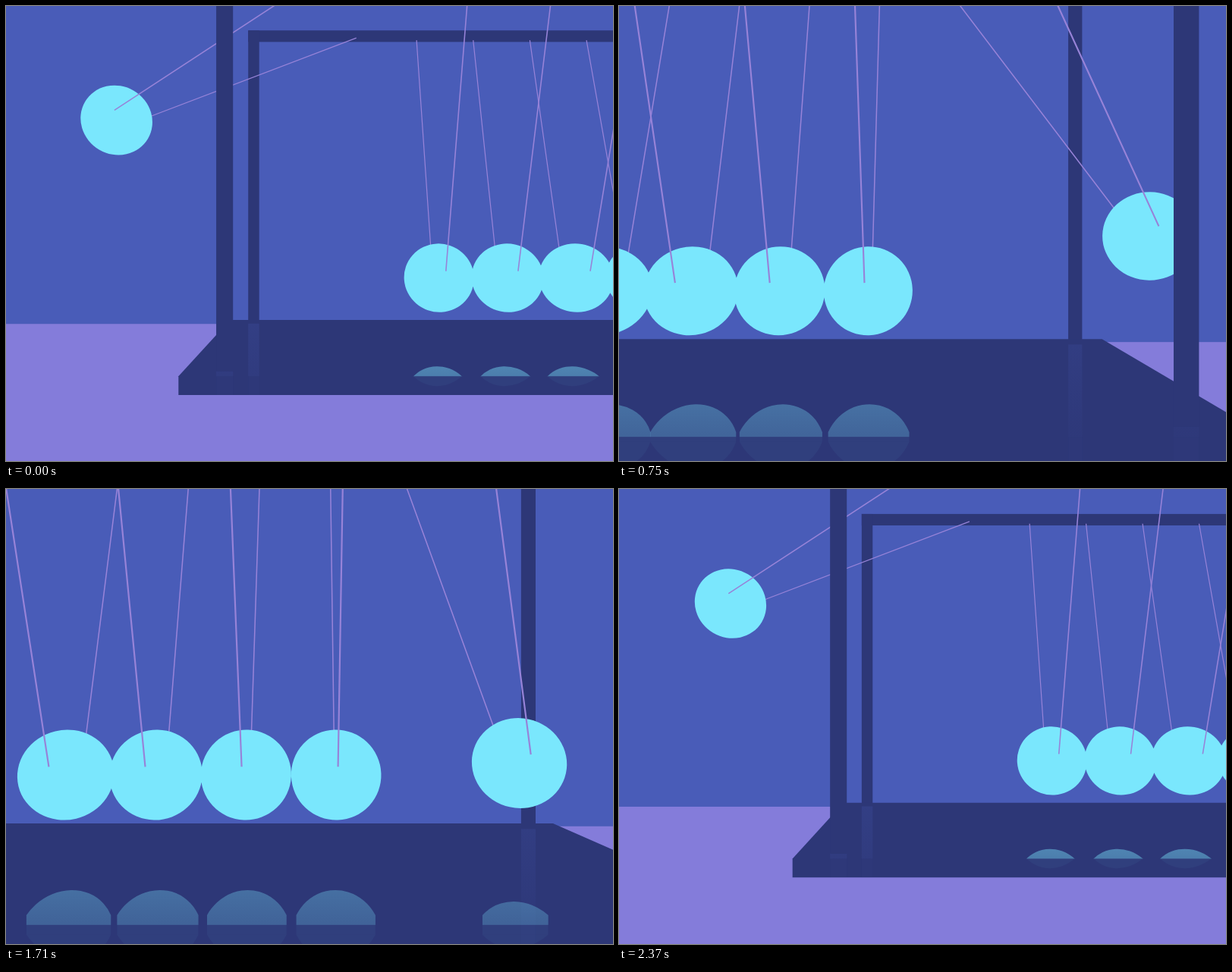
Recreate the animation shown at these times as an HTML page with a canvas. Size 800 by 600 pixels, loop 2400 ms.

```html
<!DOCTYPE html>
<html lang="en">
<head>
<meta charset="utf-8">
<title>Pendulum balls</title>
<style>
html, body { margin: 0; width: 100%; height: 100%; overflow: hidden; background: #495cb8; }
canvas { display: block; width: 800px; height: 600px; }
</style>
</head>
<body>
<canvas id="stage" width="800" height="600"></canvas>
<script>
const ctx = document.getElementById('stage').getContext('2d');
const { sin, cos, hypot, atan2, sqrt, pow, PI } = Math;
const LOOP = 2400, STEP = 30, RAD = PI / 180;
const WALL = '#495cb8', FLOOR = '#847cda', DARK = '#2d3777', BALL = '#7ae7fd', STRING = '#9783d8';

// World units: y points down from eye level, depths are measured
// from the front edge of the base in units of the focal length.
const FOCAL = 800;
const TOP = 100, BOTTOM = 113.2, MIRROR = 196.9;
const BASE = [-275, 272.2], POSTS = [-245.7, 241.3], ROD = 6.12;
const DEPTH = { front: 0.027, mid: 0.1727, back: 0.318, edge: 0.3453, wall: 0.418 };
const RAIL_Y = -221, LENGTH = 262.1, RADIUS = 31.7;
const SMEAR = 262;   // screen row below which reflections run straight down

let camX, camU;

function moveCamera(t) {
  const a = 2 * PI * t / LOOP - 176.25 * RAD;
  camX = 13.1 + 202.7 * cos(a) + 4 * cos(2 * a) - 2 * cos(3 * a);
  camU = 0.4393 - 0.012 * cos(a) + 0.002 * sin(a) + 0.085 * cos(2 * a)
       - 0.005 * sin(4 * a) - 0.003 * cos(6 * a);
}

// Fast rise after the hit, then a free fall back.
function swing(t, peak, amp, power) {
  const d = ((t - peak + LOOP * 1.5) % LOOP - LOOP / 2) / 600;
  if (d <= -1 || d >= 1) return 0;
  return amp * RAD * (d < 0 ? 1 - pow(-d, power) : cos(d * PI / 2));
}

const scale = z => 1 / (camU + z);
const project = (x, y, z) => [(x - camX) * scale(z), y * scale(z)];

function polygon(points, color) {
  ctx.beginPath();
  points.forEach(p => ctx.lineTo(p[0], p[1]));
  ctx.fillStyle = color;
  ctx.fill();
}

function box(x0, y0, x1, y1, color) {
  ctx.fillStyle = color;
  ctx.fillRect(x0, y0, x1 - x0, y1 - y0);
}

// Screen edges of a round bar whose axis sits at this offset and depth.
function barEdges(offset, z) {
  const c = offset * scale(z), half = ROD * scale(z) * hypot(1, c / FOCAL);
  return [c - half, c + half];
}

const footY = z => TOP * scale(z - ROD / FOCAL);

function post(x, z, top) {
  const [l, r] = barEdges(x - camX, z);
  box(l, top, r, footY(z), DARK);
}

function pendulums(t) {
  return [-2, -1, 0, 1, 2].map(i => {
    const angle = i === -2 ? swing(t, 0, 63.7, 2.97)
                : i === 2 ? -swing(t, 1200, 61.9, 2.5) : 0;
    const at = d => [i * 2 * RADIUS - d * sin(angle), RAIL_Y + d * cos(angle)];
    return { at, center: at(LENGTH) };
  });
}

function addSphere(x, y) {
  const X = x - camX, Z = (camU + DEPTH.mid) * FOCAL;
  const k = Z * Z - RADIUS * RADIUS, rho = hypot(X, y), dir = atan2(y, X);
  const c = FOCAL * rho * Z / k;
  const cx = c * cos(dir), cy = c * sin(dir);
  const a = FOCAL * RADIUS * sqrt(rho * rho + k) / k, b = FOCAL * RADIUS / sqrt(k);
  ctx.moveTo(cx + a * cos(dir), cy + a * sin(dir));
  ctx.ellipse(cx, cy, a, b, dir, 0, 2 * PI);
}

// Left and right x of a sphere's outline on one screen row.
function chord(x, y, row) {
  const X = x - camX, Z = (camU + DEPTH.mid) * FOCAL;
  const k = X * X + y * y + Z * Z - RADIUS * RADIUS;
  const q = row * y + FOCAL * Z;
  const A = X * X - k, B = X * q, C = q * q - k * (row * row + FOCAL * FOCAL);
  const disc = B * B - A * C;
  if (disc <= 0) return null;
  const root = sqrt(disc);
  return [(-B + root) / A, (-B - root) / A];
}

function strings(list, side) {
  const z = DEPTH[side];
  const zBall = DEPTH.mid + (side === 'front' ? -1 : 1) * 30 / FOCAL;
  ctx.strokeStyle = STRING;
  ctx.lineWidth = 0.48 * (scale(z) + scale(zBall));
  ctx.beginPath();
  for (const { at } of list) {
    ctx.moveTo(...project(...at(4.5), z));
    ctx.lineTo(...project(...at(LENGTH - 8), zBall));
  }
  ctx.stroke();
}

function clipped(x, y, w, h, draw) {
  ctx.save();
  ctx.beginPath();
  ctx.rect(x, y, w, h);
  ctx.clip();
  draw();
  ctx.restore();
}

function ballReflections(list, edge, fill) {
  clipped(-400, 0, 800, Math.min(edge, SMEAR), () => {
    ctx.beginPath();
    list.forEach(({ center: [x, y] }) => addSphere(x, MIRROR - y));
    ctx.fillStyle = fill;
    ctx.fill();
  });
  if (edge <= SMEAR) return;
  for (const { center: [x, y] } of list) {
    const span = chord(x, MIRROR - y, SMEAR);
    if (span) box(span[0], SMEAR, span[1], edge, fill);
  }
}

function fade(rgb, stops) {
  const g = ctx.createLinearGradient(0, 0, 0, 300);
  stops.forEach(([y, a]) => g.addColorStop(y / 300, `rgba(${rgb},${a})`));
  return g;
}

function reflections(list) {
  const edge = TOP * scale(0), low = BOTTOM * scale(0);
  const tint = fade('73,92,184', [[110, 0.21], [185, 0.13], [250, 0.06], [300, 0.02]]);
  for (const z of [DEPTH.back, DEPTH.front]) {
    for (const x of POSTS) {
      const [l, r] = barEdges(x - camX, z);
      box(l, footY(z), r, edge, tint);
      box(l, edge, r, low, 'rgba(73,92,184,.03)');
    }
  }
  ballReflections(list, edge, fade('122,231,253', [[175, 0.44], [188, 0.4], [226, 0.325], [272, 0.25]]));
  clipped(-400, edge, 800, low - edge, () => {
    ctx.translate(0, 2 * edge);
    ctx.scale(1, -1);
    ballReflections(list, edge, 'rgba(122,231,253,.045)');
  });
}

function draw(t) {
  moveCamera(t);
  const list = pendulums(t);
  ctx.setTransform(1, 0, 0, 1, 400, 300);
  box(-400, -300, 400, 300, WALL);
  box(-400, BOTTOM * scale(DEPTH.wall), 400, 300, FLOOR);

  const [railTop, railLow] = barEdges(RAIL_Y, DEPTH.back);
  const left = barEdges(POSTS[0] - camX, DEPTH.back)[0];
  const right = barEdges(POSTS[1] - camX, DEPTH.back)[1];
  box(left, railTop, right, railLow, DARK);
  POSTS.forEach(x => post(x, DEPTH.back, railTop));

  const [l, r] = BASE;
  polygon([
    project(l, TOP, DEPTH.edge), project(r, TOP, DEPTH.edge),
    project(r, TOP, 0), project(r, BOTTOM, 0),
    project(l, BOTTOM, 0), project(l, TOP, 0)
  ], DARK);
  reflections(list);

  strings(list, 'back');
  ctx.beginPath();
  list.forEach(p => addSphere(...p.center));
  ctx.fillStyle = BALL;
  ctx.fill();
  strings(list, 'front');
  POSTS.forEach(x => post(x, DEPTH.front, -300));
}

const start = performance.now();
function tick() {
  const t = (performance.now() - start) % LOOP;
  draw(Math.floor(t / STEP) * STEP);
  requestAnimationFrame(tick);
}
tick();
</script>
</body>
</html>
```
